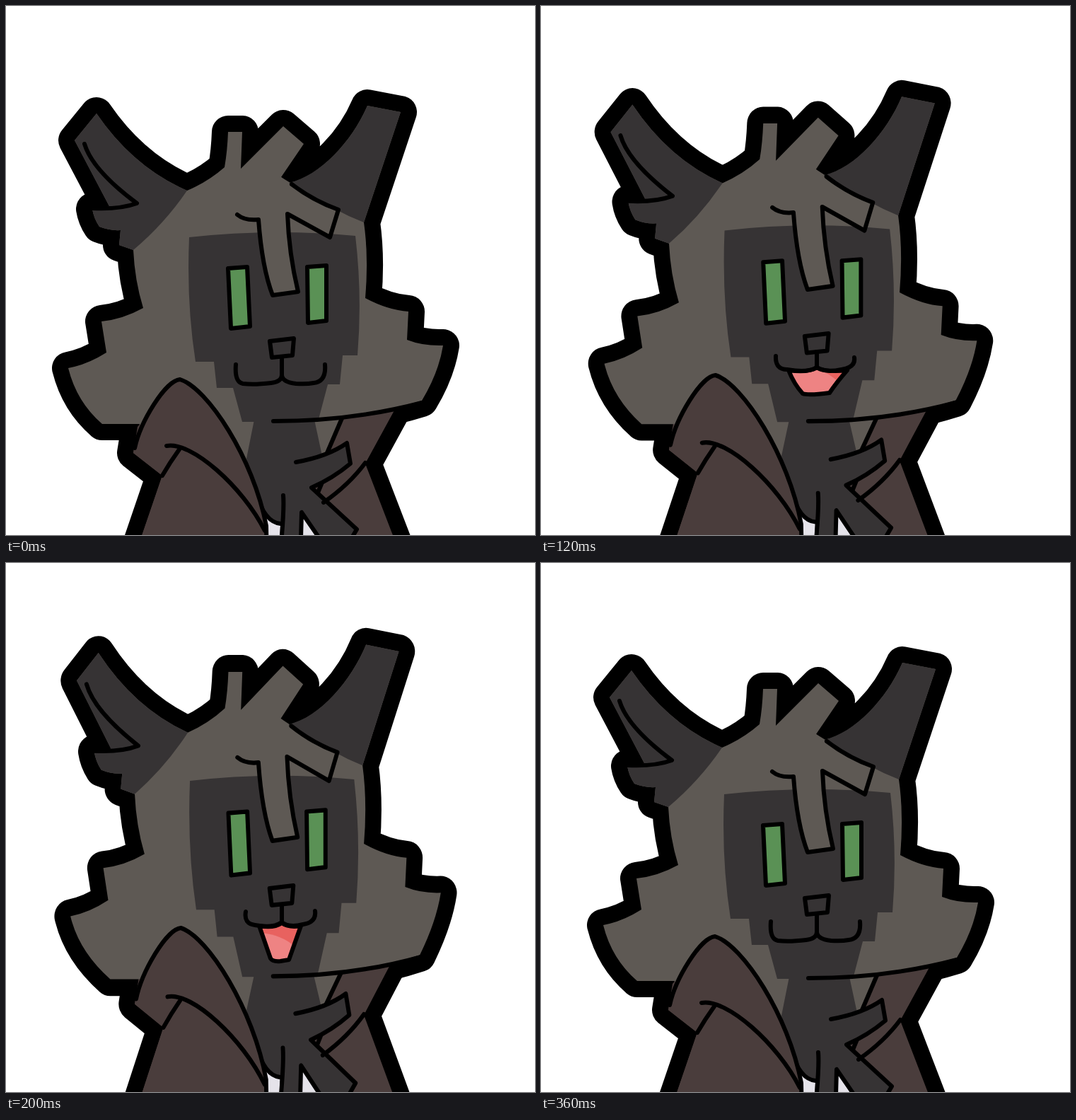
An HTML page for the animation above (0.4 s loop, 748x748 px).

```html
<!DOCTYPE html>
<html lang="en">
<head>
<meta charset="utf-8">
<title>Talking character</title>
<style>
  html, body { margin: 0; width: 100%; height: 100%; overflow: hidden; background: #fff; }
  svg { display: block; width: 100vw; height: 100vh; }
  .pose { visibility: hidden; animation: .4s step-end infinite; }
  .rest { animation-name: rest; }
  .wide { animation-name: wide; }
  .half { animation-name: half; }
  @keyframes rest { 0% { visibility: visible } 10% { visibility: hidden } 90%, 100% { visibility: visible } }
  @keyframes wide { 0% { visibility: hidden } 10% { visibility: visible } 30% { visibility: hidden } 50% { visibility: visible } 70%, 100% { visibility: hidden } }
  @keyframes half { 0% { visibility: hidden } 30% { visibility: visible } 50% { visibility: hidden } 70% { visibility: visible } 90%, 100% { visibility: hidden } }
  .halo { fill: #000; stroke: #000; stroke-width: 46; stroke-linejoin: round; }
  .ink { stroke: #000; stroke-width: 6; stroke-linejoin: round; stroke-linecap: round; }
  .fur { fill: #5e5954; }
  .dark { fill: #363334; }
  .coat { fill: #4a3d3c; }
  .shirt { fill: #e5e3ea; }
  .eye { fill: #5a9155; }
  .red { fill: #e8625f; }
  .pink { fill: #ee8383; }
  .none { fill: none; }
</style>
</head>
<body>
<svg id="stage" viewBox="0 0 748 748"></svg>
<script>
const path = (cls, d) => `<path class="${cls}" d="${d}"/>`;
const line = d => path('ink none', d);

const leftEar = 'L97,190 L146,283 Q133,288 122,287 Q124,300 132,312 Q147,318 162,317 L160,338 L180,345';
const rightEar = 'C445,240 490,190 511,141 L558,150 L506,306';
const body = 'M186,595 L180,632 L221,664 L178,790 L563,790 L508,647 L549,572 L475,580 L246,528 Z';

// jaw: how far the chin drops; pull: inward shift of the left cheek
function head(jaw, pull) {
  return `M128,152 ${leftEar} Q182,388 194,427 Q165,443 135,446 L142,490 Q115,507 88,512
    Q100,560 ${136 + pull},${591 + jaw} L188,${591 + jaw} L300,650 L340,660 L450,645 L475,${582 + jaw}
    Q530,${576 + jaw} 588,${558 + jaw} Q612,518 618,480 Q590,481 567,472 L569,432 Q540,430 508,413
    Q513,355 506,306 L558,150 L511,141 C490,190 445,240 402,250 L389,242 L421,195 L392,170
    L332,230 L334,178 L314,178 Q313,205 309,228 Q285,249 256,261 Q180,228 128,152 Z`;
}

function figure(jaw, pull) {
  const chin = 588 + jaw;
  const skull = head(jaw, pull);
  return [
    path('halo', body), path('halo', skull),
    path('coat', body), path('fur', skull),
    // ears
    path('dark', `M128,152 ${leftEar} Q224,308 256,261 Q180,228 128,152 Z`),
    path('dark', `M400,250 ${rightEar} Q485,298 465,287 Q425,270 400,250 Z`),
    line('M111,195 Q122,232 185,279 Q160,288 122,286'),
    // face
    path('dark', `M259,327 Q375,314 494,325 Q504,410 497,494 L476,494 L472,535 L455,535
      L441,${chin} L334,${chin} L321,540 L298,540 L294,503 L268,503 Q255,420 259,327 Z`),
    path('fur', 'M340,290 L357,302 Q362,370 377,409 L413,404 Q400,350 398,294 L458,327 L470,288 Q430,275 389,242 Z'),
    line('M327,295 Q338,304 357,302 Q362,370 377,409 L413,404 Q400,350 398,294 L458,327 L470,288 Q434,275 404,252'),
    path('ink eye', 'M314,371 L341,369 L345,453 L318,456 Z'),
    path('ink eye', 'M426,369 L453,367 L453,445 L427,448 Z'),
    path('ink dark', 'M373,474 L407,470 L405,494 L376,497 Z'),
    // chest
    path('shirt', 'M360,715 L388,728 L440,715 L446,790 L360,790 Z'),
    path('dark', `M351,${chin - 3} L340,640 Q352,700 372,722 Q380,731 388,732 L386,790 L416,790
      L418,716 L440,748 L470,790 L490,750 L496,740 L432,681 Q462,668 487,648 L482,618
      Q465,630 447,636 L436,${chin - 3} Z`),
    line(`M475,${583 + jaw} L454,632`), line('M446,676 L441,688'),
    line('M508,646 Q485,677 449,702'),
    line('M410,645 Q455,637 482,618 L487,647 Q462,668 432,681 L496,740 L483,762'),
    line('M470,790 L440,748 L418,716 L416,790'),
    line('M392,692 Q394,715 386,790'),
    line('M354,690 Q366,730 388,732'),
    line(`M588,${561 + jaw} Q490,${587 + jaw} 378,${587 + jaw}`),
    // near side of the coat
    path('coat', 'M246,528 C285,540 350,640 368,735 L368,790 L178,790 L221,664 L180,632 C188,590 225,530 246,528 Z'),
    line('M182,625 C190,588 225,530 246,528 C285,540 350,640 368,735 L369,790'),
    line('M227,622 C262,615 335,680 366,742'),
    line('M245,627 Q232,645 221,664')
  ].join('');
}

const smile = line('M325,507 Q323,532 335,534 Q350,536 375,533 Q390,531 390,522 Q391,532 410,534 Q425,535 435,533 Q453,531 451,507')
  + line('M390,497 V524');

function openMouth(hole, tongue, lip, top, mid) {
  return path('red', hole) + path('pink', tongue) + path('ink none', hole)
    + line(lip) + line(`M390,${top} V${mid}`);
}

const wideMouth = openMouth(
  'M358,513 L374,559 Q377,564 388,563 L400,561 Q407,541 417,513 Q400,516 390,509 Q378,517 358,513 Z',
  'M361,523 Q390,526 408,542 L400,561 L388,563 Q377,564 374,559 Z',
  'M339,493 Q336,510 352,512 Q378,517 390,508 Q400,516 420,511 Q439,508 437,492', 484, 508);

const halfMouth = openMouth(
  'M350,515 Q358,535 370,548 Q378,551 408,547 Q418,532 433,515 Q402,518 390,511 Q378,519 350,515 Z',
  'M350,515 Q378,519 390,512 Q408,520 420,531 L408,547 Q378,551 370,548 Q358,535 350,515 Z',
  'M332,495 Q331,514 348,514 Q378,519 390,511 Q402,519 425,514 Q445,511 443,497', 489, 511);

const pose = (name, stretch, jaw, pull, mouth) => {
  const m = [1 - .012 * stretch, 0, 0, 1 + .0347 * stretch, 4.2 * stretch, -30.3 * stretch];
  return `<g class="pose ${name}"><g transform="matrix(${m})">${figure(jaw, pull)}</g>${mouth}</g>`;
};

document.getElementById('stage').innerHTML =
  pose('rest', 0, 0, 0, smile) +
  pose('wide', 1, 7, 9, wideMouth) +
  pose('half', .5, 5, 5, halfMouth);
</script>
</body>
</html>
```
